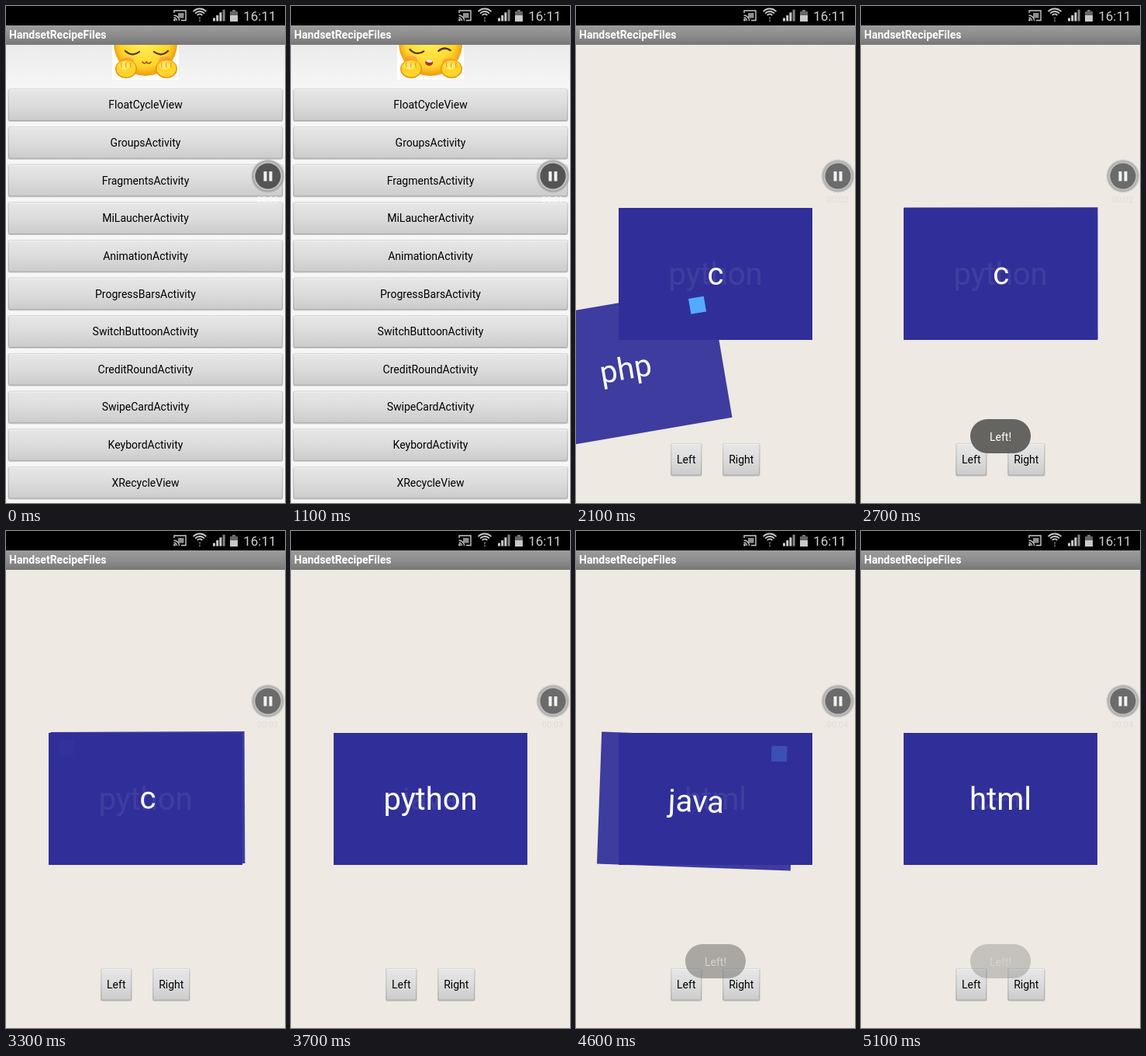
An HTML page with a canvas for the animation above (5.2 s loop, 360x640 px).

```html
<!DOCTYPE html>
<html lang="en">
<head>
<meta charset="utf-8">
<title>Swipe cards</title>
<style>
html, body { margin: 0; width: 100%; height: 100%; overflow: hidden; background: #eee9e2; }
canvas { display: block; width: 360px; height: 640px; }
</style>
</head>
<body>
<canvas id="stage"></canvas>
<script>
const W = 360, H = 640, LOOP = 5200, STEP = 100;
const canvas = document.getElementById('stage');
const ctx = canvas.getContext('2d');
const dpr = window.devicePixelRatio || 1;
canvas.width = W * dpr;
canvas.height = H * dpr;

const rows = ['FloatCycleView', 'GroupsActivity', 'FragmentsActivity', 'MiLaucherActivity',
  'AnimationActivity', 'ProgressBarsActivity', 'SwitchButtoonActivity', 'CreditRoundActivity',
  'SwipeCardActivity', 'KeybordActivity', 'XRecycleView'];

// path: [time, dx, dy]; turn is the sign given by the grabbed half
const cards = [
  { text: 'php', turn: 1, path: [[1800, 0, 0], [1900, -22, 20], [2100, -116, 122], [2200, -165, 165], [2300, -400, 300]] },
  { text: 'c', turn: -1, path: [[2600, 0, 0], [2700, 0.6, -0.6], [3300, 3, -1.5], [3600, 130, -8], [3700, 420, -25]] },
  { text: 'python', turn: -1, path: [[3800, 0, 0], [4000, -20, 3], [4200, -71, 11], [4400, -150, 22], [4500, -420, 60]] },
  { text: 'java', turn: -1, path: [[4500, 0, 0], [4600, -25, 3], [4800, -140, 18], [4900, -420, 55]] },
  { text: 'html' }, { text: 'c++' }, { text: 'css' }, { text: 'javascript' }
];

// each toast: fade in from a to b, fade out from c to d
const toasts = [
  { text: 'Left!', at: [2300, 2500, 2900, 3100] },
  { text: 'Right!', at: [3700, 3900, 4300, 4500] },
  { text: 'Left!', at: [4500, 4700, 4960, 5160] }
];

const clamp = v => Math.max(0, Math.min(1, v));

function track(path, t) {
  if (!path || t <= path[0][0]) return [0, 0];
  for (let i = 1; i < path.length; i++) {
    const [t0, x0, y0] = path[i - 1], [t1, x1, y1] = path[i];
    if (t <= t1) {
      const k = (t - t0) / (t1 - t0);
      return [x0 + (x1 - x0) * k, y0 + (y1 - y0) * k];
    }
  }
  return null;
}

function text(s, x, y, size, color, align = 'center', weight = 400) {
  ctx.font = `${weight} ${size}px Roboto, sans-serif`;
  ctx.textAlign = align;
  ctx.textBaseline = 'alphabetic';
  ctx.fillStyle = color;
  ctx.fillText(s, x, y);
}

function box(x, y, w, h, fill) {
  ctx.fillStyle = fill;
  ctx.fillRect(x, y, w, h);
}

function round(x, y, w, h, r) {
  ctx.beginPath();
  ctx.roundRect(x, y, w, h, r);
}

function disc(x, y, rx, fill, ry = rx) {
  ctx.beginPath();
  ctx.ellipse(x, y, rx, ry, 0, 0, Math.PI * 2);
  ctx.fillStyle = fill;
  ctx.fill();
}

function curve(x0, y0, cx, cy, x1, y1, color, width) {
  ctx.beginPath();
  ctx.moveTo(x0, y0);
  ctx.quadraticCurveTo(cx, cy, x1, y1);
  ctx.strokeStyle = color;
  ctx.lineWidth = width;
  ctx.lineCap = 'round';
  ctx.stroke();
  ctx.lineCap = 'butt';
}

function shade(y0, y1, ...colors) {
  const g = ctx.createLinearGradient(0, y0, 0, y1);
  colors.forEach((c, i) => g.addColorStop(i / (colors.length - 1), c));
  return g;
}

function button(x, y, w, h, label) {
  round(x - 0.5, y, w + 1, h + 1, 2.5);
  ctx.fillStyle = 'rgba(0,0,0,0.2)';
  ctx.fill();
  round(x, y, w, h, 2);
  ctx.fillStyle = shade(y, y + h, '#e7e7e7', '#dcdcdc', '#cbcbcb');
  ctx.fill();
  round(x + 0.5, y + 0.5, w - 1, h - 1, 2);
  ctx.strokeStyle = shade(y, y + h, '#d6d6d6', '#a9a9a9');
  ctx.lineWidth = 1;
  ctx.stroke();
  box(x + 1.5, y + 1, w - 3, 1, '#f1f1f1');
  text(label, x + w / 2, y + h / 2 + 5, 14, '#000');
}

function face(t) {
  const sway = Math.sin(t / 880 * Math.PI * 2);
  const open = sway > 0.4;
  ctx.save();
  ctx.beginPath();
  ctx.rect(137, 50, 86, 45);
  ctx.clip();
  box(137, 50, 86, 45, '#fff');
  ctx.save();
  ctx.translate(180, 50);
  ctx.rotate(sway * 0.08);
  const skin = ctx.createRadialGradient(-4, -8, 8, 0, -2, 42);
  skin.addColorStop(0, '#ffee55');
  skin.addColorStop(0.7, '#ffd52a');
  skin.addColorStop(1, '#f09a12');
  disc(0, -2, 41, skin, 42);
  disc(-23, 21, 8, 'rgba(255,120,70,0.5)', 5);
  disc(25, 20, 8, 'rgba(255,120,70,0.5)', 5);
  curve(-26, 8, -17, 16, -8, 9, '#54300e', 2.2);
  if (open) {
    curve(11, 7, 18, 0, 26, 5, '#54300e', 2.4);
    disc(0, 23, 5, '#b53622', 4);
    disc(0, 21, 4, '#fff', 1.8);
  } else {
    curve(11, 9, 20, 16, 29, 8, '#54300e', 2.2);
    curve(-4, 22, -1, 26, 1, 22, '#9a4a18', 1.5);
    curve(1, 22, 4, 26, 7, 22, '#9a4a18', 1.5);
  }
  ctx.restore();
  for (const side of [-1, 1]) {
    const x = 181 + side * 26;
    disc(x, 81, 14, '#eb930e', 12);
    disc(x, 80.5, 12.5, '#ffd42c', 10.8);
    disc(x - 2, 77, 7, '#ffe968', 5);
    for (let i = -1; i < 2; i++) curve(x + i * 6, 73, x + i * 6 - 1, 76, x + i * 6, 79, '#ed9d18', 1.2);
  }
  ctx.restore();
}

function listScreen(t) {
  box(0, 50, W, 590, shade(50, 105, '#ebebeb', '#f6f6f6'));
  face(t);
  rows.forEach((label, i) => button(3, 106.5 + i * 48.65, 354, 41.5, label));
}

function card({ text: label, turn = 1 }, dx, dy) {
  ctx.save();
  ctx.translate(180 + dx, 345 + dy);
  ctx.rotate(turn * 30 * dx / W * Math.PI / 180);
  box(-125, -85, 250, 170, 'rgba(49,48,153,0.93)');
  text(label, 0, 13.7, 40, '#fff');
  const alpha = ctx.globalAlpha;
  ctx.globalAlpha = alpha * clamp(Math.abs(dx) / 90);
  if (dx < 0) box(95, -75, 20, 20, '#55aaff');
  if (dx > 0) box(-115, -75, 20, 20, '#aa55ff');
  ctx.restore();
}

function toast({ text: label, at: [a, b, c, d] }, t) {
  const alpha = Math.min(clamp((t - a) / (b - a)), clamp((d - t) / (d - c)));
  if (!alpha) return;
  ctx.save();
  ctx.globalAlpha = alpha;
  ctx.font = '400 14px Roboto, sans-serif';
  const w = ctx.measureText(label).width + 50;
  round(180 - w / 2, 532, w, 44, 22);
  ctx.fillStyle = 'rgba(82,82,80,0.88)';
  ctx.fill();
  text(label, 180, 559.5, 14, '#fff');
  ctx.restore();
}

function swipeScreen(t) {
  box(0, 50, W, 590, '#eee9e2');
  const live = cards.map(c => ({ c, pos: track(c.path, t) })).filter(e => e.pos).slice(0, 4);
  live.reverse().forEach(({ c, pos }) => card(c, ...pos));
  button(122.5, 563, 39.5, 41.5, 'Left');
  button(189.5, 563, 47.5, 41.5, 'Right');
  toasts.forEach(item => toast(item, t));
}

function arc(x, y, r, from, to, color, width) {
  ctx.beginPath();
  ctx.arc(x, y, r, from * Math.PI, to * Math.PI);
  ctx.strokeStyle = color;
  ctx.lineWidth = width;
  ctx.stroke();
}

function statusBar() {
  const ink = '#c9c9c9';
  box(0, 0, W, 25, '#000');
  ctx.beginPath();
  ctx.moveTo(217, 9);
  ctx.lineTo(217, 6);
  ctx.lineTo(232, 6);
  ctx.lineTo(232, 18.5);
  ctx.lineTo(226, 18.5);
  ctx.strokeStyle = ink;
  ctx.lineWidth = 1.4;
  ctx.stroke();
  box(222, 9, 7.5, 6.5, '#8d8d8d');
  disc(217.5, 18, 1.4, ink);
  for (const r of [4, 7]) arc(216.5, 19, r, -0.5, 0, ink, 1.4);

  for (const r of [4.5, 8, 11.5]) arc(250, 15, r, -0.76, -0.24, ink, 1.8);
  text('↕', 250, 20, 10, ink, 'center', 700);

  for (let i = 0; i < 4; i++) {
    const h = 4 + i * 3.6;
    box(267 + i * 4.2, 19.5 - h, 3, h, i < 3 ? ink : '#858585');
  }

  box(292, 5, 4, 2, '#777');
  box(289, 7, 10, 13, '#666');
  box(289, 12, 10, 8, ink);
  text('16:11', 348.5, 19, 17, '#cfcfcf', 'right');
}

function titleBar() {
  box(0, 25, W, 25, shade(25, 50, '#9c9c9c', '#8d8d8d', '#777777'));
  text('HandsetRecipeFiles', 4, 42, 14, '#fff', 'left', 700);
}

function recorder(t, faded) {
  ctx.save();
  ctx.globalAlpha = 1 - 0.22 * faded;
  disc(338, 219, 21.5, 'rgba(130,130,130,0.35)');
  disc(338, 219, 20, '#a6a6a6');
  disc(338, 219, 18.5, '#c3c3c3');
  disc(338, 219, 16.5, '#545454');
  ctx.restore();
  box(332.5, 213, 4, 12.5, '#f2f2f2');
  box(339.5, 213, 4, 12.5, '#f2f2f2');
  const clock = '00:0' + Math.floor(t / 1030);
  text(clock, 337.5, 253, 11, faded > 0.5 ? '#e0dcd6' : 'rgba(255,255,255,0.75)');
}

function draw(t) {
  ctx.setTransform(dpr, 0, 0, dpr, 0, 0);
  ctx.globalAlpha = 1;
  const fade = clamp((t - 1200) / 300);
  if (fade < 1) listScreen(t);
  if (fade > 0) {
    ctx.globalAlpha = fade;
    swipeScreen(t);
    ctx.globalAlpha = 1;
  }
  statusBar();
  titleBar();
  recorder(t, fade);
}

const start = performance.now();
function tick() {
  const t = (performance.now() - start) % LOOP;
  draw(Math.floor(t / STEP) * STEP);
  requestAnimationFrame(tick);
}
tick();
</script>
</body>
</html>
```
